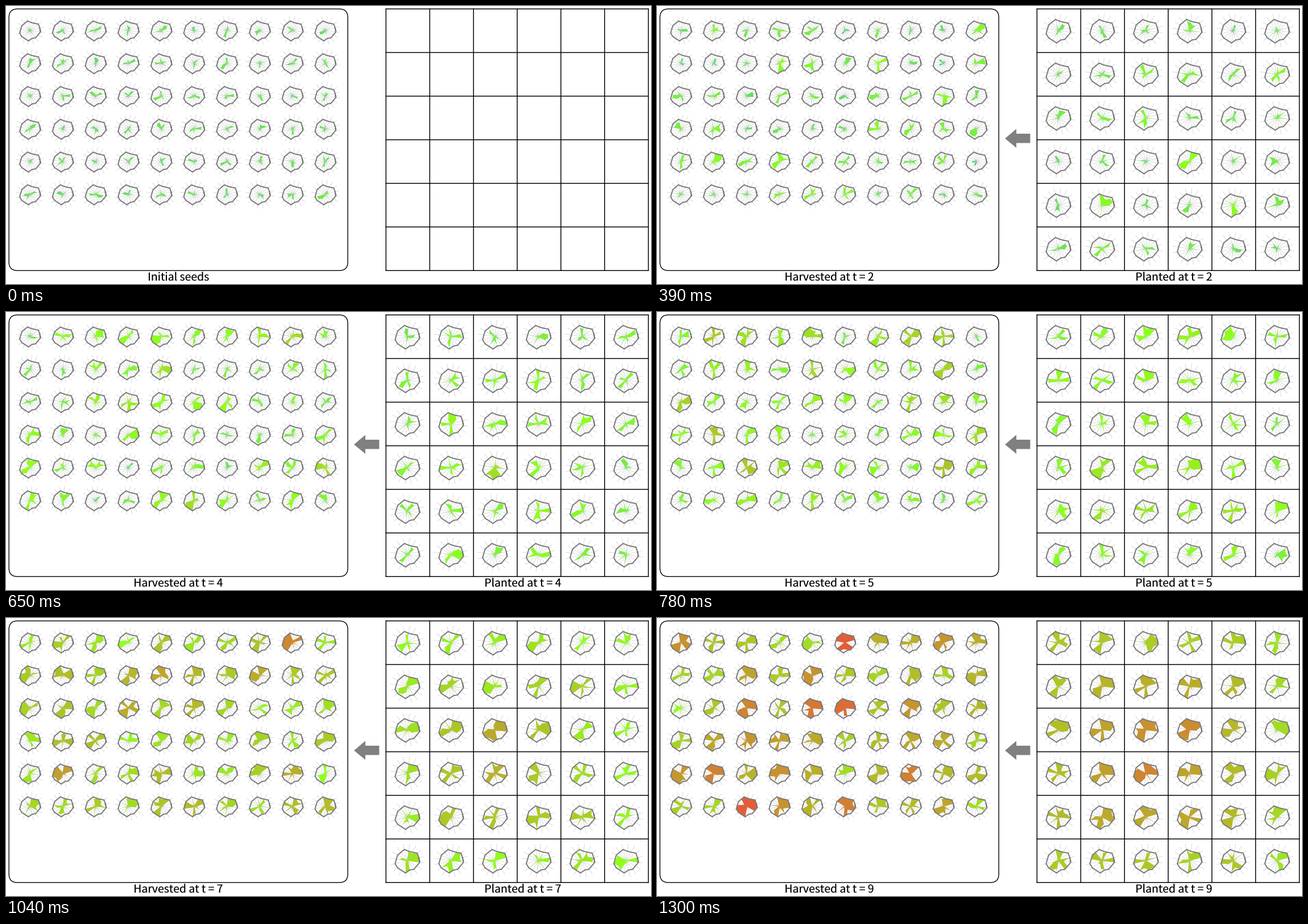
A matplotlib script that plays this animation: 1138x492 px, repeating every 4300 ms.

```python
import numpy as np
import matplotlib.pyplot as plt
from matplotlib.animation import FuncAnimation
from matplotlib.collections import PolyCollection
from matplotlib.patches import FancyBboxPatch, Polygon

W, H, DPI = 1138, 492, 100
PX = 72 / DPI
TICK, STEP, LOOP = 10, 130, 4300
LAST = 10
LEFT, RIGHT, TOP, SIDE = 5.2, 670.4, 5.2, 463
CELL = SIDE / 6
N_RAYS = 16

plt.rcParams["font.family"] = ["Noto Sans CJK JP", "DejaVu Sans"]
plt.rcParams["text.hinting"] = "none"
plt.rcParams["path.simplify"] = False
plt.rcParams["path.snap"] = False

fig = plt.figure(figsize=(W / DPI, H / DPI), dpi=DPI, facecolor="white")
ax = fig.add_axes([0, 0, 1, 1])
ax.set(xlim=(0, W), ylim=(H, 0))
ax.axis("off")

# Geometry of one seed: rays at even angles, a lock outline across them
angles = np.radians(-8 + 360 / N_RAYS * np.arange(N_RAYS))
rays = np.column_stack([np.cos(angles), -np.sin(angles)])
radii = np.array([18.8, 17.8, 18.6, 14.6, 14.2, 17.2, 15.6, 16.6,
                  16.4, 18.8, 18.1, 17, 18.8, 14.6, 16.4, 16.2])
lock = rays * radii[:, None]

seed_pos = np.array([(42.3 + 57.9 * c, 43.2 + 58 * r)
                     for r in range(6) for c in range(10)])
plant_pos = np.array([(708 + CELL * c, 43.5 + CELL * r)
                      for r in range(6) for c in range(6)])
centers = np.vstack([seed_pos, plant_pos])
scales = np.repeat([1, 1.18], [len(seed_pos), len(plant_pos)])


def mix(a, b, f):
    return a + (b - a) * f


def colors(q):
    teal, lime, red = np.array([(80, 206, 132), (143, 255, 30), (226, 94, 56)]) / 255
    q = q[:, None]
    return np.where(q < 0.4, mix(teal, lime, q / 0.4), mix(lime, red, (q - 0.4) / 0.6))


def quality(t, first, rng):
    """Fitness of every seed, then of every plant; the best grow mid-grid."""
    age = t / 9
    mean = 0.16 + 0.52 * age ** 1.3
    spread = 0.03 if first else 0.08 + 0.05 * age
    seeds = mean + spread * rng.standard_normal(len(seed_pos))
    row, col = np.divmod(np.arange(len(plant_pos)), 6)
    dist = np.maximum(abs(row - 2.6), abs(col - 2.1))
    noise = 0.02 + 0.05 * min(t, 1) * (1 - age)
    plants = mean + age * (0.22 - 0.125 * dist) + noise * rng.standard_normal(len(dist))
    return np.clip(np.concatenate([seeds, plants]), 0, 1)


def shapes(q, rng):
    """Each ray reaches a share of the lock; fitter seeds fill more of it."""
    q = q[:, None]
    bias = np.cos(2 * (angles - 0.8)) + 0.6 * np.cos(angles - 1.5)
    luck = rng.random((len(q), N_RAYS)) + 0.3 * q * bias
    rank = luck.argsort(axis=1).argsort(axis=1) / (N_RAYS - 1)
    rank = rank + 0.03 * rng.standard_normal(rank.shape)
    fill = 0.15 + 0.72 * q
    peak = 0.58 + 0.36 * np.minimum(q / 0.4, 1)
    reach = 0.06 + peak / (1 + np.exp((1 - fill - rank) / (0.12 - 0.09 * q)))
    return centers[:, None] + scales[:, None, None] * reach[..., None] * lock


def generation(step):
    rng = np.random.default_rng(70 + step)
    q = quality(max(step - 1, 0), step == 0, rng)
    return shapes(q, rng), colors(q)


def draw_many(points, pos, scale, **style):
    """One line through a repeated pattern; NaN rows lift the pen."""
    xy = (pos[:, None] + scale * points).reshape(-1, 2)
    return ax.plot(xy[:, 0], xy[:, 1], solid_capstyle="butt",
                   solid_joinstyle="miter", **style)[0]


gap = np.full((1, 2), np.nan)
spokes = np.vstack([p for ray in rays for p in (0 * ray[None], 25.5 * ray[None], gap)])
outline = np.vstack([lock, lock[:2], gap])


def draw_locks(pos, scale):
    return [draw_many(spokes, pos, scale, color="#dadada", lw=1 * PX, zorder=1),
            draw_many(outline, pos, scale, color="#7a7a7a", lw=2 * PX, zorder=3)]


draw_locks(seed_pos, 1)
planted = draw_locks(plant_pos, 1.18)

ax.add_patch(FancyBboxPatch((LEFT, TOP), 597.8, SIDE,
                            boxstyle="round,pad=0,rounding_size=15",
                            fc="none", ec="black", lw=1.4 * PX))
for i in range(7):
    x, y = RIGHT + CELL * i, TOP + CELL * i
    ax.plot([x, x], [TOP, TOP + SIDE], color="black", lw=1.5 * PX)
    ax.plot([RIGHT, RIGHT + SIDE], [y, y], color="black", lw=1.5 * PX)

arrow = ax.add_patch(Polygon([(614, 234.5), (634, 217.5), (634, 226), (658.5, 226),
                              (658.5, 242.5), (634, 242.5), (634, 251)], fc="#808080", lw=0))
label = dict(ha="center", va="baseline", fontsize=19.5 * PX, color="black")
left = ax.text(304, 486, "", **label)
right = ax.text(911.7, 486, "", **label)
planted += [arrow, right]

generations = [generation(s) for s in range(LAST + 1)]
fills = ax.add_collection(PolyCollection([], lw=0, zorder=2), autolim=False)


def update(frame):
    step = min(frame * TICK // STEP, LAST)
    polys, tint = generations[step]
    count = len(polys) if step else len(seed_pos)
    fills.set_verts(polys[:count])
    fills.set_facecolor(tint[:count])
    for artist in planted:
        artist.set_visible(step > 0)
    left.set_text(f"Harvested at t = {step - 1}" if step else "Initial seeds")
    right.set_text(f"Planted at t = {step - 1}")
    return [fills, left, *planted]


anim = FuncAnimation(fig, update, frames=LOOP // TICK, interval=TICK,
                     repeat=True, repeat_delay=0)
plt.show()
```
